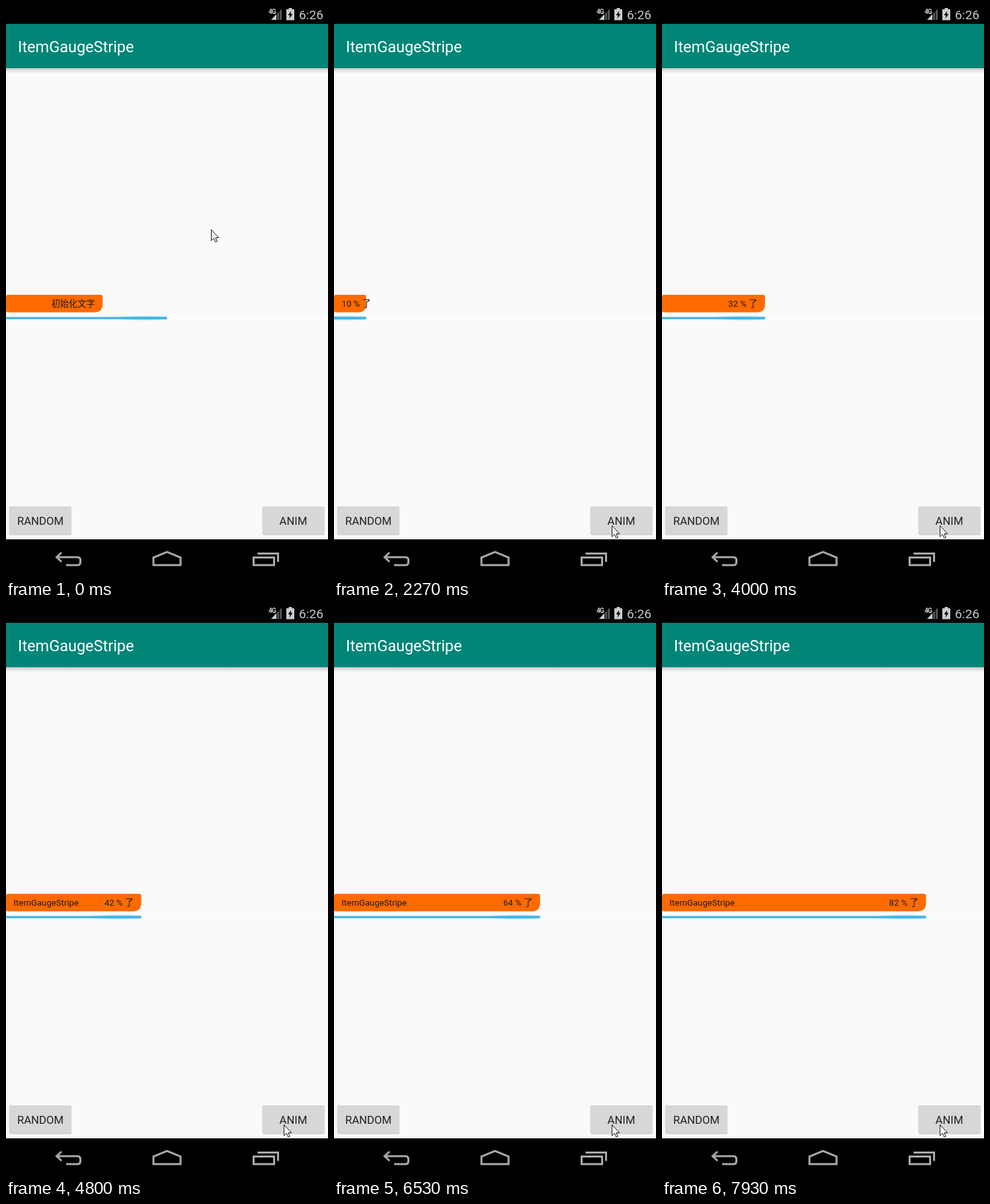
An HTML page that plays this animation: 487x864 px, repeating every 8000 ms.

```html
<!DOCTYPE html>
<html lang="zh-CN">
<head>
<meta charset="utf-8">
<title>Progress tag</title>
<style>
  html, body { margin: 0; width: 100%; height: 100%; overflow: hidden; background: #fafafa; }
  svg { display: block; }
  text { font-family: Roboto, "Noto Sans CJK SC", "Noto Sans CJK", sans-serif; white-space: pre; }
  .tag { font-size: 13.2px; fill: #1a1a1a; }
  .btn { font-size: 16.7px; fill: #222; text-anchor: middle; }
  .nav { fill: none; stroke: #a9a9a9; stroke-width: 3; }
</style>
</head>
<body>
<svg width="487" height="864" viewBox="0 0 487 864">
  <defs>
    <linearGradient id="shade" x1="0" y1="0" x2="0" y2="1">
      <stop offset="0" stop-color="#000" stop-opacity=".36"/>
      <stop offset=".35" stop-color="#000" stop-opacity=".13"/>
      <stop offset="1" stop-color="#000" stop-opacity="0"/>
    </linearGradient>
    <radialGradient id="glow">
      <stop offset="0" stop-color="#33b5e5" stop-opacity=".8"/>
      <stop offset=".6" stop-color="#33b5e5" stop-opacity=".4"/>
      <stop offset="1" stop-color="#33b5e5" stop-opacity="0"/>
    </radialGradient>
  </defs>
  <rect width="487" height="864" fill="#fafafa"/>

  <!-- app bar -->
  <rect y="93" width="487" height="9" fill="url(#shade)"/>
  <rect y="27" width="487" height="67" fill="#008577"/>
  <text x="18" y="70" font-size="23.5" fill="#fff">ItemGaugeStripe</text>

  <!-- status bar -->
  <rect width="487" height="27"/>
  <text x="397" y="12" font-size="10" font-weight="700" fill="#ccc" textLength="11.5">4G</text>
  <path d="M417 4V21H401Z" fill="#555"/>
  <path d="M409 12.500V21H401Z" fill="#ccc"/>
  <path d="M409.500 12V21M413.500 8V21" stroke="#000" stroke-width="1"/>
  <path d="M427.500 3h5v2h3.500v16.500h-12V5h3.500Z" fill="#ccc"/>
  <path d="M431.500 7.500l-5 6.500h3l-1 5 5-7h-3Z"/>
  <text x="443" y="20" font-size="19.2" fill="#ccc">6:26</text>

  <!-- progress -->
  <rect y="472" width="487" height="2" fill="#fff"/>
  <path id="box" fill="#ff6a00"/>
  <text class="tag" id="name" x="11.500" y="455">ItemGaugeStripe</text>
  <text class="tag" id="label" y="455"></text>
  <svg id="bar" x="0" y="466" height="12">
    <rect y="4.500" width="487" height="3.500" fill="#4bb7e4"/>
    <ellipse id="spot" cy="6.200" rx="55" ry="4" fill="url(#glow)"/>
  </svg>

  <!-- buttons -->
  <rect x="5" y="758" width="94" height="42.500" rx="2.500" fill="#c4c4c4"/>
  <rect x="4.500" y="757" width="94.500" height="42.500" rx="2.500" fill="#d6d7d7"/>
  <text class="btn" x="52" y="785">RANDOM</text>
  <rect x="388" y="758" width="94" height="42.500" rx="2.500" fill="#c4c4c4"/>
  <rect id="anim" x="387.500" y="757" width="94.500" height="42.500" rx="2.500" fill="#d6d7d7"/>
  <text class="btn" x="434.500" y="785">ANIM</text>

  <!-- navigation bar -->
  <rect y="807" width="487" height="57"/>
  <path class="nav" d="M84 827L76.500 834L84 841M77 834H108Q112.500 834 112.500 838.500V841.500Q112.500 846 108 846H91"/>
  <path class="nav" d="M223 846V834.500L243.500 826L264 834.500V846Z"/>
  <path class="nav" d="M374.500 834.500H405.500V846H374.500ZM380.500 828.500H411.500V841"/>

  <path id="mouse" d="M.5.500V17L4.300 13.400L6.800 19H7.600L9.300 18.200L6.900 12.600H11.800Z"
    fill="#fff" stroke="#111" stroke-width="1" stroke-linejoin="round"/>
</svg>
<script>
const LOOP = 8000, TICK = 200 / 3, WIDTH = 487, PAD = 11.5;
const CLICK = 22, PRESS = 19;
const $ = id => document.getElementById(id);
const [box, name, label, bar, spot, anim, mouse] =
  ["box", "name", "label", "bar", "spot", "anim", "mouse"].map($);

// pointer stops: tick, x, y
const stops = [
  [1, 310, 338], [5, 110, 690], [7, 52, 775], [8, 47, 792],
  [10, 110, 790], [13, 305, 781], [14, 305, 781], [17, 420, 786]
];

function pointerAt(n) {
  const i = stops.findIndex(s => s[0] >= n);
  if (i < 0) return stops[stops.length - 1].slice(1);
  if (i === 0) return stops[0].slice(1);
  const a = stops[i - 1], b = stops[i];
  const k = (n - a[0]) / (b[0] - a[0]);
  return [1, 2].map(j => Math.round(a[j] + (b[j] - a[j]) * k));
}

function boxPath(w) {
  if (w <= 0) return "";
  const r = Math.min(3, w / 2), c = Math.min(12.5, w - r);
  return `M${r} 437H${w - r}q${r} 0 ${r} ${r}V${463.5 - c}q0 ${c} ${-c} ${c}` +
    `H${r}q${-r} 0 ${-r} ${-r}V${437 + r}q0 ${-r} ${r} ${-r}Z`;
}

function setProgress(tag, line, text) {
  const w = tag * WIDTH / 100, end = line * WIDTH / 100;
  box.setAttribute("d", boxPath(w));
  label.textContent = text;
  label.setAttribute("x", Math.max(PAD, w - PAD - label.getComputedTextLength()));
  bar.setAttribute("width", end);
  bar.style.visibility = end > 0 ? "visible" : "hidden";
  spot.setAttribute("cx", end - 32);
}

function draw(n) {
  const running = n >= CLICK;
  const p = Math.max(0, Math.floor((n - 21.04) / 1.192));
  if (running) setProgress(p, p, p + " % 了");
  else setProgress(30, 50, "初始化文字");
  name.style.visibility = running && p >= 37 ? "visible" : "hidden";
  anim.setAttribute("fill", n < PRESS || running ? "#d6d7d7" : n === PRESS ? "#c8c9c9" : "#bcbdbd");
  mouse.setAttribute("transform", `translate(${pointerAt(n)})`);
}

let last = -1;
function frame() {
  const n = Math.floor((performance.now() % LOOP + 4) / TICK) % (LOOP / TICK);
  if (n !== last) draw(last = n);
  requestAnimationFrame(frame);
}
frame();
</script>
</body>
</html>
```
